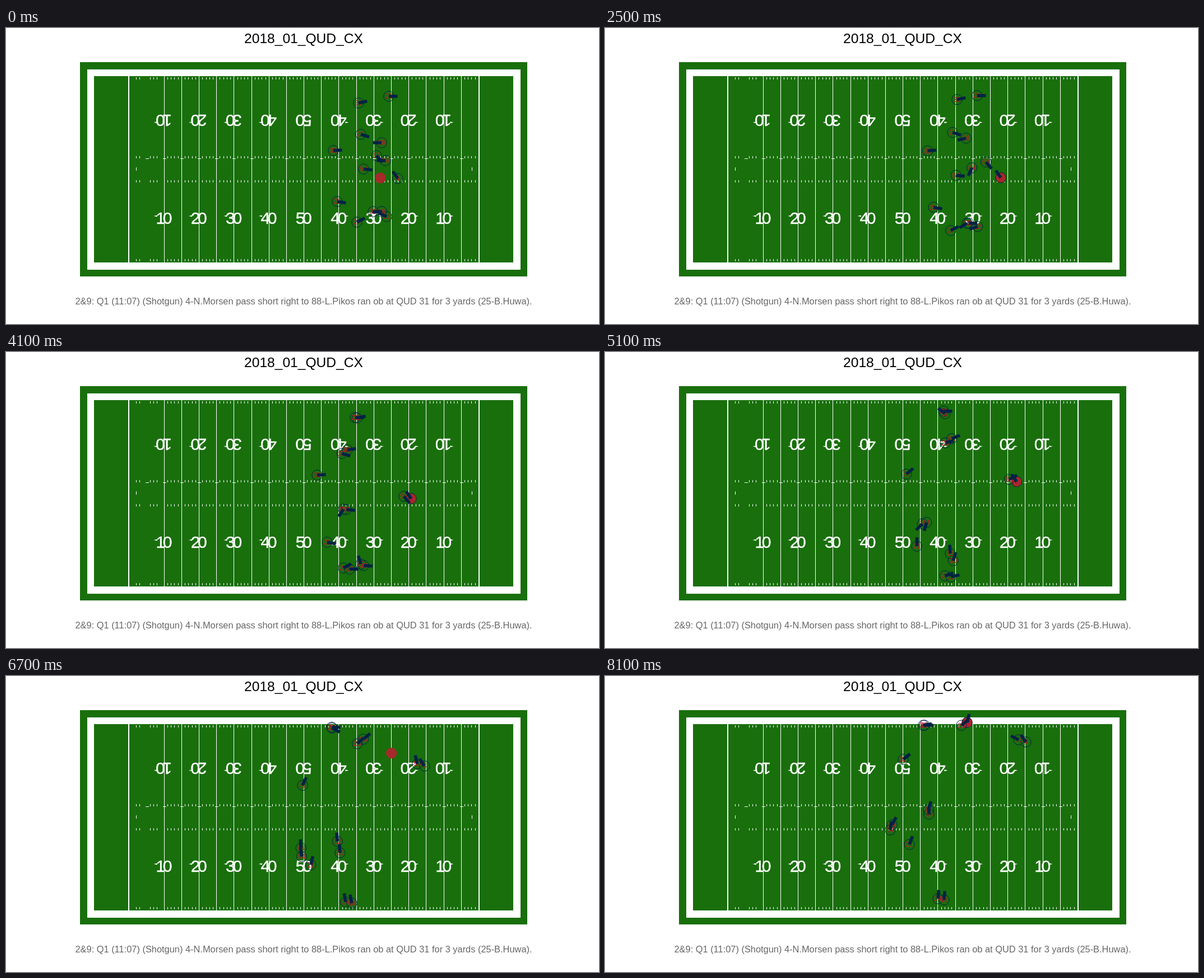
An HTML page that plays this animation: 1058x529 px, repeating every 8200 ms.

```html
<!DOCTYPE html>
<html lang="en">
<head>
<meta charset="utf-8">
<title>Play tracking</title>
<style>
  html, body { margin: 0; width: 100%; height: 100%; overflow: hidden; background: #fff; }
  svg { display: block; width: 100%; height: 100%; }
  text { font-family: "Liberation Sans", Arial, sans-serif; text-anchor: middle; }
  .title { font-size: 24.6px; fill: #000; }
  .caption { font-size: 16.4px; fill: #666; }
  .yards { font-size: 30px; letter-spacing: -4.4px; fill: #fff; stroke: #fff; stroke-width: .4; }
  .lines { stroke: #fff; stroke-width: 1; shape-rendering: crispEdges; }
  .ring { fill: none; stroke: #002244; stroke-width: 1; }
  .bar { stroke: #002244; stroke-width: 5.5; }
  .num { font-size: 12px; fill: #c60c30; }
</style>
</head>
<body>
<svg viewBox="0 0 1058 529">
  <rect width="1058" height="529" fill="#fff"/>
  <text class="title" x="531" y="26.5">2018_01_QUD_CX</text>
  <g shape-rendering="crispEdges">
    <rect x="132" y="61" width="798" height="382.5" fill="#196f0c"/>
    <rect x="145" y="74" width="773" height="357.5" fill="#fff"/>
    <rect x="157" y="86" width="748" height="332.5" fill="#196f0c"/>
  </g>
  <g id="lines" class="lines"></g>
  <g id="numbers"></g>
  <use href="#numbers" transform="rotate(180 531.1 252.4)"/>
  <circle id="ball" r="9.7" fill="#a52a2a"/>
  <g id="rings"></g>
  <g id="labels"></g>
  <g id="bars"></g>
  <text class="caption" x="531" y="494">2&amp;9: Q1 (11:07) (Shotgun) 4-N.Morsen pass short right to 88-L.Pikos ran ob at QUD 31 for 3 yards (25-B.Huwa).</text>
</svg>
<script>
const LOOP = 8200, STEP = 100;
const SNAP = 1000, START = 1200, CAUGHT = 1400, MEET = 4100, THROW = 6150, CATCH = 7150;
const TIMES = [START, MEET, 6000, 8100];
const $ = id => document.getElementById(id);
const yardX = yard => 157 + yard * 6.235;
const clamp = u => Math.max(0, Math.min(1, u));
const mix = (a, b, u) => a.map((v, i) => v + (b[i] - v) * u);

function set(el, attrs) {
  for (const key in attrs) el.setAttribute(key, attrs[key]);
}
function add(id, name, attrs, text) {
  const el = document.createElementNS("http://www.w3.org/2000/svg", name);
  set(el, attrs);
  if (text !== undefined) el.textContent = text;
  return $(id).appendChild(el);
}
function line(x1, y1, x2, y2, width = 1) {
  add("lines", "line", { x1, y1, x2, y2, "stroke-width": width });
}

function drawField() {
  line(219.3, 86, 219.3, 418.5, 2);
  line(843.8, 86, 843.8, 418.5, 2);
  for (let yard = 12; yard < 110; yard++) {
    const x = Math.round(yardX(yard)) + 0.5;
    if (yard % 5 === 0) {
      if (yard > 15) line(x, 86, x, 418.5);
      line(x - 3, 233.5, x + 3, 233.5);
    } else if (yard !== 14 && yard !== 19) {
      for (const y of [88, 229, 272, 413]) line(x, y, x, y + 4);
    }
  }
  for (const x of [232.5, 831.5]) line(x, 249, x, 255);

  for (let i = -4; i <= 4; i++) {
    const x = yardX(60 + i * 10), side = Math.sign(i);
    add("numbers", "text", { class: "yards", x: x - 2, y: 350 }, 50 - Math.abs(i) * 10);
    if (side)
      add("numbers", "path", { d: `M${x + side * 18} 336l${-side * 6} -1.5v3z`, fill: "#fff" });
  }
}

// Smooth run through one point per entry of TIMES, at rest at both ends.
function route(...points) {
  const slope = (k, c) => (points[k + 1][c] - points[k][c]) / (TIMES[k + 1] - TIMES[k]);
  const tangent = (k, c) => {
    if (k === 0 || k === TIMES.length - 1) return 0;
    const a = slope(k - 1, c), b = slope(k, c);
    return a * b <= 0 ? 0 : 2 * a * b / (a + b);
  };
  return t => {
    let i = 0;
    while (i < TIMES.length - 2 && t >= TIMES[i + 1]) i++;
    const span = TIMES[i + 1] - TIMES[i], u = clamp((t - TIMES[i]) / span);
    return mix(points[i], points[i + 1], u * u * (3 - 2 * u)).map((v, c) =>
      v + span * u * (1 - u) * (tangent(i, c) * (1 - u) - tangent(i + 1, c) * u));
  };
}

// A defender closes in on a man, then trails him.
function cover(start, man, dx, dy, lag = 0) {
  const spot = t => {
    const [x, y] = man(t - lag);
    return [x + dx, y + dy];
  };
  return t => t < MEET
    ? mix(start, spot(MEET), clamp((t - START) / (MEET - START)) ** 1.2)
    : spot(t);
}

const players = [];
function player(num, at, facing, turn) {
  players.push({
    at, facing: facing * Math.PI / 180, turn,
    ring: add("rings", "circle", { class: "ring", r: 9.2 }),
    label: add("labels", "text", { class: "num" }, num),
    bar: add("bars", "line", { class: "bar" })
  });
}

const passer = route([699, 269], [723, 262], [743, 191], [751, 118]);
const catcher = route([670, 205], [609, 175], [631, 133], [646, 83]);
const wide = route([683, 122], [623, 117], [590, 95], [570, 88]);
const back = route([677, 237], [602, 281], [539, 322], [512, 266]);
const outer = route([670, 328], [613, 388], [621, 408], [605, 400]);
const crosser = route([679, 337], [633, 379], [602, 329], [577, 239]);

drawField();
player(4, passer, 235, Infinity);
player(26, wide, 0, Infinity);
player(88, catcher, 180, START);
player(84, back, 180, START);
player(16, outer, 175, START);
player(12, crosser, 204, START);
player(31, cover([629, 134], wide, -3, 0, 300), -12, MEET);
player(25, cover([633, 190], catcher, -10, 5, 100), 17, MEET);
player(53, cover([661, 228], passer, -13, -4), 50, MEET);
player(54, cover([638, 252], back, -4, 6, 300), 6, MEET);
player(30, cover([655, 328], crosser, 0, 4, 300), 3, MEET);
player(24, cover([626, 347], outer, -11, -2), -28, MEET);
player(32, route([584, 219], [555, 220], [528, 214], [532, 149]), -4, MEET);
player(21, route([591, 310], [573, 340], [545, 350], [543, 301]), 10, MEET);

function ballAt(t) {
  if (t < CAUGHT) return mix([668, 268], passer(CAUGHT), clamp((t - SNAP) / (CAUGHT - SNAP)));
  if (t < THROW) return passer(t);
  return t < CATCH
    ? mix(passer(THROW), catcher(CATCH), (t - THROW) / (CATCH - THROW))
    : catcher(t);
}

// Fast runners look where they go, slow ones look at the ball.
function heading(p, t, ball) {
  const u = clamp((t - p.turn) / 1300);
  if (!u) return p.facing;
  const now = p.at(t), before = p.at(t - 100);
  const far = Math.hypot(ball[0] - now[0], ball[1] - now[1]) || 1;
  const [dx, dy] = now.map((v, c) => (v - before[c]) / 2 + (ball[c] - v) / far);
  const diff = Math.atan2(dy, dx) - p.facing;
  return p.facing + Math.atan2(Math.sin(diff), Math.cos(diff)) * u;
}

function draw(t) {
  const ball = ballAt(t);
  set($("ball"), { cx: ball[0], cy: ball[1] });
  for (const p of players) {
    const [x, y] = p.at(t), a = heading(p, t, ball);
    set(p.ring, { cx: x, cy: y });
    set(p.label, { x, y: y + 4.3 });
    set(p.bar, { x1: x, y1: y, x2: x + 15.6 * Math.cos(a), y2: y + 15.6 * Math.sin(a) });
  }
}

const begin = performance.now();
function tick() {
  const t = (performance.now() - begin) % LOOP;
  draw(Math.floor(t / STEP) * STEP);
  requestAnimationFrame(tick);
}
tick();
</script>
</body>
</html>
```
